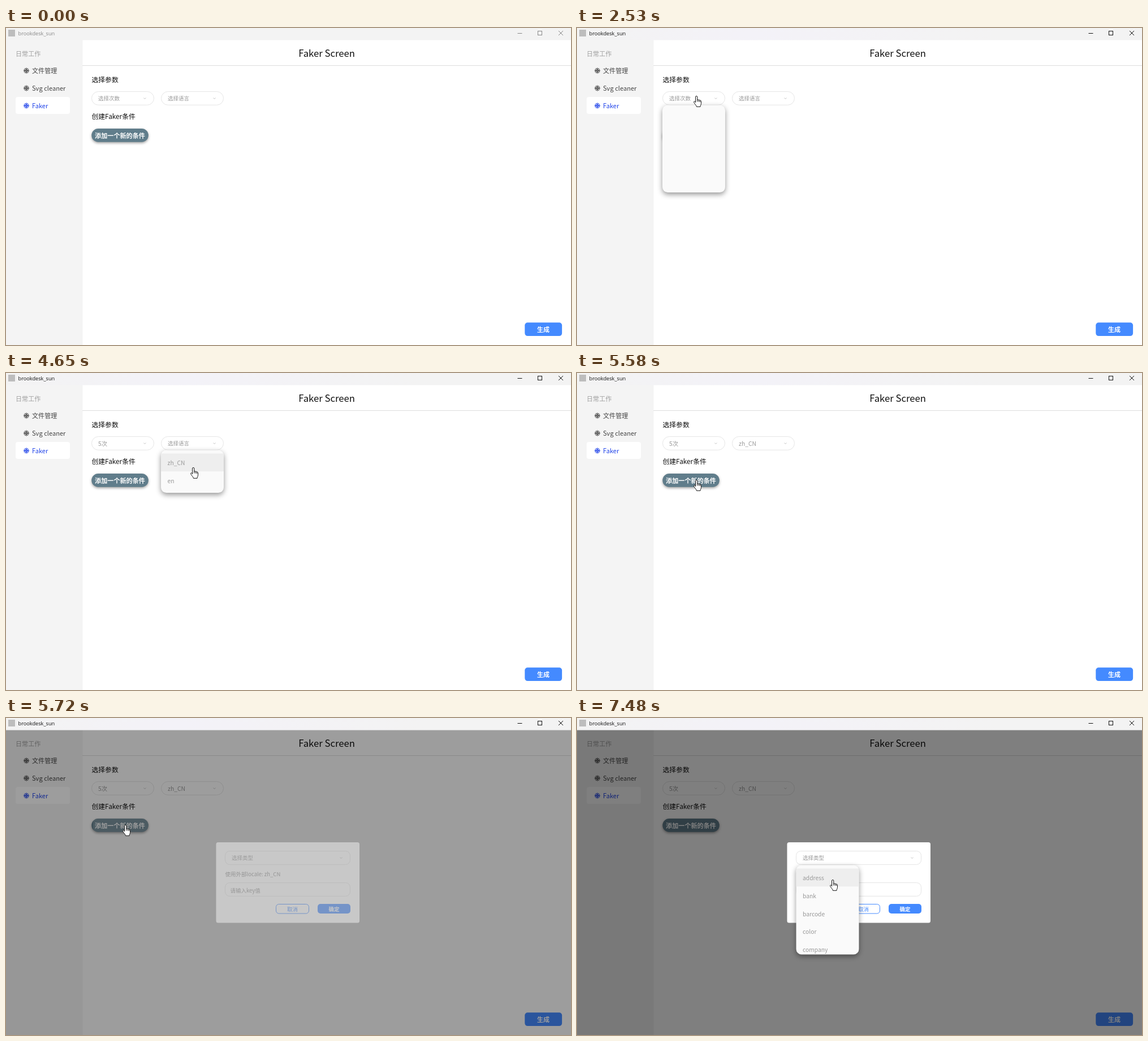
Write an HTML page with a canvas that moves like this. It is 999 by 561 pixels and loops after 8 s.

```html
<!DOCTYPE html>
<html lang="zh-CN">
<head>
<meta charset="utf-8">
<title>Faker Screen</title>
<style>
html, body { margin: 0; width: 100%; height: 100%; overflow: hidden; background: #fff; }
canvas { display: block; }
</style>
</head>
<body>
<canvas id="stage" width="999" height="561"></canvas>
<script>
const stage = document.getElementById('stage');
const layer = document.createElement('canvas');
layer.width = stage.width;
layer.height = stage.height;
let ctx = stage.getContext('2d');

const LOOP = 8000;
const TICK = 66.2;
const SANS = '"Noto Sans CJK SC", "Noto Sans CJK", "Noto Sans", sans-serif';
const BLUE = '#448aff';
const GRAY = '#999';
const ROW = 31.7;
const CONTROL = 23.8;
const DROP = 111;

// The pointer enters at START, then glides to each spot and rests there.
const START = { x: 957, y: 545 };
const MOVES = [
  { from: 390, to: 660, x: 744, y: 376 },
  { from: 900, to: 1180, x: 739, y: 372 },
  { from: 1350, to: 1580, x: 361, y: 230 },
  { from: 1750, to: 2260, x: 210, y: 120 },
  { from: 2890, to: 3180, x: 208, y: 183 },
  { from: 3200, to: 3500, x: 201, y: 173 },
  { from: 3720, to: 4160, x: 330, y: 124 },
  { from: 4470, to: 4630, x: 330, y: 167 },
  { from: 4750, to: 4830, x: 325, y: 162 },
  { from: 5030, to: 5490, x: 210, y: 189 },
  { from: 5800, to: 6400, x: 459, y: 242 },
  { from: 6970, to: 7280, x: 449, y: 289 },
  { from: 7290, to: 7470, x: 451, y: 286 }
];

const MENUS = [
  { x: 151, y: 136.5, h: 158, open: 2368, close: 3630, items: ['5次', '10次', '20次', '50次', '100次'] },
  { x: 274, y: 136.5, h: 75.5, open: 4300, close: 4960, items: ['zh_CN', 'en'] },
  { x: 387.5, y: 260.5, h: 158, open: 6540, close: LOOP,
    items: ['address', 'bank', 'barcode', 'color', 'company'] }
];
const DIALOG_OPEN = 5580;

const clamp = v => Math.max(0, Math.min(1, v));
const progress = (t, from, to) => clamp((t - from) / (to - from));
const smooth = v => v * v * (3 - 2 * v);

function withAlpha(alpha, draw) {
  ctx.save();
  ctx.globalAlpha *= alpha;
  draw();
  ctx.restore();
}

// Fades a drawing as one flat picture, so overlapping parts do not show through.
function fadeGroup(alpha, draw) {
  if (alpha <= 0) return;
  const base = ctx;
  ctx = layer.getContext('2d');
  ctx.clearRect(0, 0, layer.width, layer.height);
  ctx.save();
  draw();
  ctx.restore();
  ctx = base;
  withAlpha(alpha, () => ctx.drawImage(layer, 0, 0));
}

function rect(x, y, w, h, color) {
  ctx.fillStyle = color;
  ctx.fillRect(x, y, w, h);
}

function roundPath(x, y, w, h, r) {
  ctx.beginPath();
  ctx.roundRect(x, y, w, h, r);
}

function roundFill(x, y, w, h, r, color) {
  roundPath(x, y, w, h, r);
  ctx.fillStyle = color;
  ctx.fill();
}

function roundStroke(x, y, w, h, r, color) {
  roundPath(x, y, w, h, r);
  ctx.strokeStyle = color;
  ctx.lineWidth = 1;
  ctx.stroke();
}

function shadowFill(x, y, w, h, r, color, shade, blur, dy) {
  ctx.save();
  ctx.shadowColor = shade;
  ctx.shadowBlur = blur;
  ctx.shadowOffsetY = dy;
  roundFill(x, y, w, h, r, color);
  ctx.restore();
}

function line(color, width, ...points) {
  ctx.beginPath();
  points.forEach(([x, y]) => ctx.lineTo(x, y));
  ctx.strokeStyle = color;
  ctx.lineWidth = width;
  ctx.stroke();
}

// y is the middle of the glyphs.
function text(str, x, y, size, color, weight = 400, align = 'left', family = SANS) {
  ctx.font = `${weight} ${size}px ${family}`;
  ctx.textAlign = align;
  ctx.fillStyle = color;
  ctx.fillText(str, x, y + size * 0.38);
}

function snowflake(x, y, color) {
  ctx.save();
  ctx.translate(x, y);
  for (let i = 0; i < 4; i++) {
    line(color, 1.1, [0, 0], [5.2, 0]);
    line(color, 1.1, [4.2, -2.7], [1.5, 0], [4.2, 2.7]);
    ctx.rotate(Math.PI / 2);
  }
  ctx.restore();
}

function chevron(x, y) {
  line('#bbb', 0.9, [x - 2, y - 0.8], [x, y + 0.9], [x + 2, y - 0.8]);
}

function titleBar(active) {
  const ink = active ? '#111' : '#888';
  const tint = ctx.createLinearGradient(0, 0, 999, 0);
  tint.addColorStop(0, '#f3f3f3');
  tint.addColorStop(0.3, active ? '#f3f2f8' : '#f3f3f3');
  tint.addColorStop(0.75, '#f3f3f3');
  rect(0, 0, 999, 21.5, tint);
  rect(4, 3, 12, 12, '#bdbdbd');
  text('brookdesk_sun', 21.5, 9.3, 9.2, ink, 400, 'left', '"Open Sans", sans-serif');
  line(ink, 1, [904.5, 9.5], [912.5, 9.5]);
  ctx.strokeRect(940.5, 5.5, 7, 7);
  line(ink, 1, [977, 5], [985, 13]);
  line(ink, 1, [985, 5], [977, 13]);
}

function sidebar() {
  rect(0, 21, 135.5, 540, '#f4f4f4');
  text('日常工作', 17, 46, 11.1, '#a0a0a0', 500);
  roundFill(17, 122, 96, 30, 4, '#fff');
  ['文件管理', 'Svg cleaner', 'Faker'].forEach((label, i) => {
    const y = 75.5 + 31 * i, color = i === 2 ? '#2346ea' : '#444';
    snowflake(36, y, color);
    text(label, 46, y + 0.5, 11.1, color, 500);
  });
}

function select(x, value, hint) {
  roundStroke(x + 0.5, 112.5, DROP - 1, CONTROL, 12, '#e6e6e6');
  if (value) text(value, x + 12, 125, 10.3, GRAY);
  else text(hint, x + 12, 124.7, 9.5, GRAY);
  chevron(x + 94.5, 124.5);
}

function addButton(t) {
  const shape = [151.3, 178, 100.5, CONTROL, CONTROL / 2];
  shadowFill(...shape, '#607d8b', 'rgba(0,0,0,.36)', 4.5, 2);
  ctx.save();
  roundPath(...shape);
  ctx.clip();
  ctx.beginPath();
  ctx.arc(211, 190, 60 * progress(t, 5560, 5700), 0, 7);
  ctx.fillStyle = `rgba(255,255,255,${0.17 * (1 - progress(t, 5700, 5820))})`;
  ctx.fill();
  ctx.restore();
  text('添加一个新的条件', 201.5, 190.8, 11.1, '#fff', 700, 'center');
}

function page(t) {
  rect(0, 21, 999, 540, '#fff');
  sidebar();
  text('Faker Screen', 567, 44.5, 16.7, '#111', 500, 'center');
  line('#dedede', 1, [135, 66.5], [999, 66.5]);
  text('选择参数', 151.5, 92, 11.8, '#111');
  select(151, t >= MENUS[0].close && '5次', '选择次数');
  select(274, t >= MENUS[1].close && 'zh_CN', '选择语言');
  text('创建Faker条件', 151.5, 157, 11.8, '#111');
  addButton(t);
  roundFill(917.3, 521.3, 65.8, CONTROL, 5, BLUE);
  text('生成', 950, 533.8, 11.1, '#fff', 700, 'center');
}

function dialog() {
  roundFill(371.5, 220, 253.5, 142.5, 3.5, '#fff');
  roundStroke(387.5, 235.5, 221, CONTROL, 8, '#e4e4e4');
  text('选择类型', 399, 247.7, 9.5, GRAY);
  chevron(592.5, 247.5);
  text('使用外部locale: zh_CN', 387.5, 276, 9.5, '#8c8c8c', 500);
  roundStroke(387.5, 291.5, 221, CONTROL, 8, '#e4e4e4');
  text('请输入key值', 396.5, 305.3, 9.5, '#909090');
  roundStroke(477.5, 329.5, 58, 16.5, 5, BLUE);
  text('取消', 506.5, 338, 9.5, BLUE, 500, 'center');
  roundFill(551, 329, 58, 17, 5, BLUE);
  text('确定', 580, 338, 9.5, '#fff', 700, 'center');
}

// Fades in, unrolls, then reveals its items one after another.
function menu({ x, y, h, open, close, items }, t) {
  const phase = (t - open) / 300;
  const alpha = clamp(phase / 0.25) * (1 - progress(t, close, close + 90));
  const height = 48 + (h - 48) * progress(phase, 0.25, 0.5);
  const unit = 0.5 / (items.length + 1.5);
  fadeGroup(alpha, () => {
    shadowFill(x, y, DROP, height, 9.5, '#fafafa', 'rgba(0,0,0,.42)', 10, 3.5);
    roundPath(x, y, DROP, height, 9.5);
    ctx.clip();
    items.forEach((label, i) => {
      const start = 0.5 + (i + 1) * unit;
      withAlpha(progress(phase, start, start + 1.5 * unit), () => {
        if (i === 0) rect(x, y + 6, DROP, ROW, '#eee');
        text(label, x + 11.5, y + 22.7 + ROW * i, 10.3, GRAY);
      });
    });
  });
}

const ARROW = new Path2D('M.5 .5V13.5L3.6 10.7 5.6 15.4 7.5 14.6 5.5 10.1H9.7Z');
const HAND = new Path2D('M3.6 12V2A1.6 1.6 0 0 1 6.8 2V7.3A1.4 1.4 0 0 1 9.3 7.7A1.3 1.3 0 0 1 11.6 8.4' +
  'A1.2 1.2 0 0 1 13.5 9.4V13.5C13.5 16 12 17 12 19.3H5.4C5.4 17 2 14.5 .7 11.5C.1 9.8 1.9 9 3.6 11');
const FINGERS = new Path2D('M6.8 7V10.5M9.3 7.7V10.7M11.6 8.4V11');

function overTarget(x, y, t) {
  const inside = (zx, zy, w, h) => x >= zx && x <= zx + w && y >= zy && y <= zy + h;
  const onMenu = MENUS.some(m => t >= m.open && t < m.close + 90 && inside(m.x, m.y, DROP, m.h));
  if (onMenu) return true;
  if (t > DIALOG_OPEN + 250) return inside(387, 235, 222, 25);
  return inside(151, 112, DROP, 25) || inside(274, 112, DROP, 25) || inside(151, 178, 101, 25);
}

function pointer(t) {
  if (t < MOVES[0].from) return;
  let { x, y } = START;
  for (const move of MOVES) {
    const p = smooth(progress(t, move.from, move.to));
    x += (move.x - x) * p;
    y += (move.y - y) * p;
  }
  const hand = overTarget(x, y, t);
  const shape = hand ? HAND : ARROW;
  ctx.save();
  ctx.translate(Math.round(x) - (hand ? 4 : 0), Math.round(y));
  ctx.fillStyle = '#fff';
  ctx.strokeStyle = '#111';
  ctx.lineWidth = 1;
  ctx.lineJoin = 'round';
  ctx.fill(shape);
  ctx.stroke(shape);
  if (hand) ctx.stroke(FINGERS);
  ctx.restore();
}

function render(t) {
  const dim = 0.5 * smooth(progress(t, DIALOG_OPEN + 10, DIALOG_OPEN + 160));
  page(t);
  menu(MENUS[0], t);
  menu(MENUS[1], t);
  rect(0, 21, 999, 540, `rgba(0,0,0,${dim})`);
  fadeGroup(smooth(progress(t, DIALOG_OPEN, DIALOG_OPEN + 245)), dialog);
  menu(MENUS[2], t);
  titleBar(t >= 2300);
  pointer(t);
}

const began = performance.now();
function tick() {
  const t = (performance.now() - began) % LOOP;
  render(Math.floor((t + 4) / TICK) * TICK);
  requestAnimationFrame(tick);
}
tick();
</script>
</body>
</html>
```
